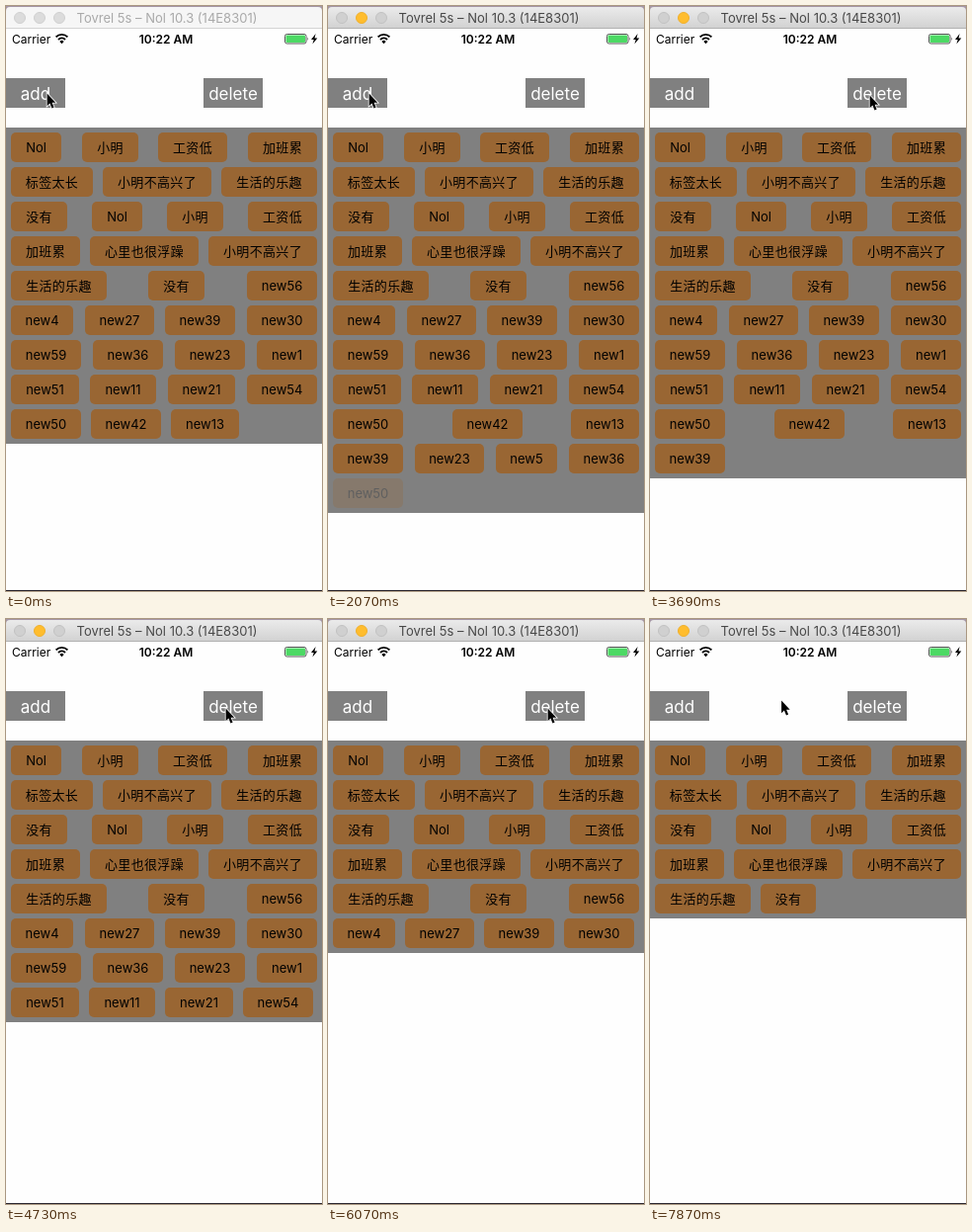
An HTML page for the animation above (8 s loop, 320 px wide and 592 px high).

```html
<!DOCTYPE html>
<html lang="zh-CN">
<head>
<meta charset="utf-8">
<title>Tag list</title>
<style>
html, body { margin: 0; width: 100%; height: 100%; overflow: hidden; background: #fff; }
body { font-family: Inter, "Noto Sans CJK SC", "Noto Sans CJK", sans-serif; }
#stage { position: absolute; left: 0; top: 0; width: 320px; height: 592px; overflow: hidden; background: #fefefe; }
#stage > *, .tag, .light { position: absolute; }
#desk { left: 0; top: 0; width: 320px; height: 12px; background: #a596a5; }
#bar { left: 0; top: 1px; width: 320px; height: 22px; box-sizing: border-box; border-radius: 4px 4px 0 0;
  background: #f6f6f6; border-bottom: 1px solid #d4d4d4; color: #a9a9a9;
  font-size: 13px; line-height: 23px; text-align: center; }
#bar span { position: absolute; left: 0; top: 0; width: 326px; white-space: nowrap; }
.light { top: 5px; width: 12px; height: 12px; box-sizing: border-box; border-radius: 50%;
  background: #dcdcdc; border: 1px solid #d0d0d0; }
#bar.on { background: linear-gradient(#ebebeb, #d2d2d2); border-color: #b1b1b1; color: #484848; }
#bar.on .light { background: #d0d0d0; border-color: #c2c2c2; }
#bar.on .mid { background: #ffbd2e; border-color: #f0b02c; }
.status { top: 26px; font-size: 12px; line-height: 15px; color: #000; white-space: nowrap; }
.button { top: 73px; width: 60px; height: 30px; background: #808080; color: #fff;
  font-size: 17px; line-height: 33px; text-align: center; }
#box { left: 0; top: 123px; width: 320px; background: #808080; }
.tag { height: 30px; border-radius: 5px; background: #996633; color: #000;
  font-size: 13px; line-height: 30px; text-align: center; white-space: nowrap; }
.cjk { letter-spacing: .33px; }
#edge { left: 0; top: 591px; width: 320px; height: 1px; background: #2b2730; }
#cursor { left: 0; top: 0; overflow: visible; }
</style>
</head>
<body>
<div id="stage">
  <div id="desk"></div>
  <div id="bar">
    <i class="light" style="left:8px"></i>
    <i class="light mid" style="left:28px"></i>
    <i class="light" style="left:48px"></i>
    <span>Tovrel 5s – Nol 10.3 (14E8301)</span>
  </div>
  <div class="status" style="left:6px">Carrier</div>
  <div class="status" style="left:102px;width:120px;text-align:center;font-weight:600">10:22 AM</div>
  <svg width="320" height="20" style="left:0;top:23px">
    <g fill="none" stroke="#000" stroke-width="1.9">
      <path d="M50.6 8.4a8.2 8.2 0 0 1 11.8 0"/>
      <path d="M53 11a5 5 0 0 1 7 0"/>
    </g>
    <path d="M56.5 15.3l-2.1-2.4a3 3 0 0 1 4.2 0z"/>
    <rect x="282.5" y="5.5" width="21.5" height="9.5" rx="2" fill="#fff" stroke="#555"/>
    <rect x="283.5" y="6.5" width="19.5" height="7.5" rx="1" fill="#4cd964"/>
    <path d="M305.4 8.4q1.6 1.8 0 3.6z" fill="#555"/>
    <path d="M313.6 5l-4.6 6h2.7l-1.3 4.6 4.9-6.2h-2.8z"/>
  </svg>
  <div class="button" style="left:0">add</div>
  <div class="button" style="left:200px">delete</div>
  <div id="box"></div>
  <div id="edge"></div>
  <svg id="cursor" width="14" height="20">
    <path d="M.6 .6V13.2L3.4 10.6L5.5 15.4L7.6 14.5L5.6 9.8H9.2Z" stroke="#fff" stroke-width="1.6" paint-order="stroke"/>
  </svg>
</div>
<script>
const LOOP = 8000, STEP = 148;
const words = "Nol 小明 工资低 加班累 标签太长 小明不高兴了 生活的乐趣 没有".split(" ");
const start = [...words, ...words.slice(0, 4), "心里也很浮躁", ...words.slice(5),
  ...[56, 4, 27, 39, 30, 59, 36, 23, 1, 51, 11, 21, 54, 50, 42, 13].map(n => "new" + n)];

// time, label, opacity on first appearance
const adds = [[600, "new39", .4], [1330, "new23", .5], [1480, "new5", .06],
  [1770, "new36", .15], [2070, "new50", .25]];
// each one drops the last tag
const drops = [3100, 3250, 3550, 3690, 4140, 4290, 4440, 4730, 4880, 5030, 5180,
  5480, 5630, 5770, 5920, 6070, 6370, 6520, 6670, 6970, 7720];
// time, x, y of the pointer tip
const moves = [[0, 41, 88], [2360, 43, 91], [2510, 92, 98], [2660, 152, 96],
  [2810, 205, 93], [2950, 222, 90], [7870, 132.5, 82]];

const digits = [8.4, 6.2, 8, 8.2, 8.6, 8.2, 8.4, 7.5, 8.4, 8.4];
const $ = id => document.getElementById(id);
const box = $("box"), bar = $("bar"), cursor = $("cursor");

function widthOf(label) {
  if (label === "Nol") return 51.4;
  if (!label.startsWith("new")) return 30 + 13.33 * label.length;
  return [...label.slice(3)].reduce((w, d) => w + digits[d], 54.5);
}

function tagsAt(t) {
  const tags = start.map(label => ({ label, alpha: 1 }));
  for (const [at, label, first] of adds) {
    if (t < at) break;
    const n = Math.floor((t - at + 10) / STEP);
    tags.push({ label, alpha: Math.min(1, first + .55 * n) });
  }
  const gone = drops.filter(at => t >= at).length;
  return tags.slice(0, tags.length - gone);
}

// Full rows are justified, the last one keeps the smallest gap.
function layout(tags) {
  const rows = [];
  let room = -1;
  for (const tag of tags) {
    tag.w = widthOf(tag.label);
    if (room < tag.w) {
      rows.push([]);
      room = 310;
    }
    rows[rows.length - 1].push(tag);
    room -= tag.w + 10;
  }
  rows.forEach((row, i) => {
    const used = row.reduce((sum, tag) => sum + tag.w, 0);
    const gap = i < rows.length - 1 ? (310 - used) / (row.length - 1) : 10;
    let x = 5;
    for (const tag of row) {
      tag.left = Math.round(x);
      tag.right = Math.round(x + tag.w);
      tag.top = 5 + 35 * i;
      x += tag.w + gap;
    }
  });
  return rows.length;
}

let shown = "";
function drawTags(t) {
  const tags = tagsAt(t);
  const key = tags.map(tag => tag.label + tag.alpha).join();
  if (key === shown) return;
  shown = key;
  box.style.height = 5 + 35 * layout(tags) + "px";
  box.replaceChildren(...tags.map(({ label, alpha, left, right, top }) => {
    const el = document.createElement("div");
    el.className = /^[a-z]/i.test(label) ? "tag" : "tag cjk";
    el.textContent = label;
    el.style.cssText = `left:${left}px;top:${top}px;width:${right - left}px;opacity:${alpha}`;
    return el;
  }));
}

function draw(now) {
  const t = now % LOOP;
  const [, x, y] = moves.filter(m => t >= m[0]).pop();
  cursor.style.transform = `translate(${x}px,${y}px)`;
  bar.className = t >= 600 ? "on" : "";
  drawTags(t);
}

function tick() {
  draw(performance.now());
  requestAnimationFrame(tick);
}
draw(0);
requestAnimationFrame(tick);
</script>
</body>
</html>
```
